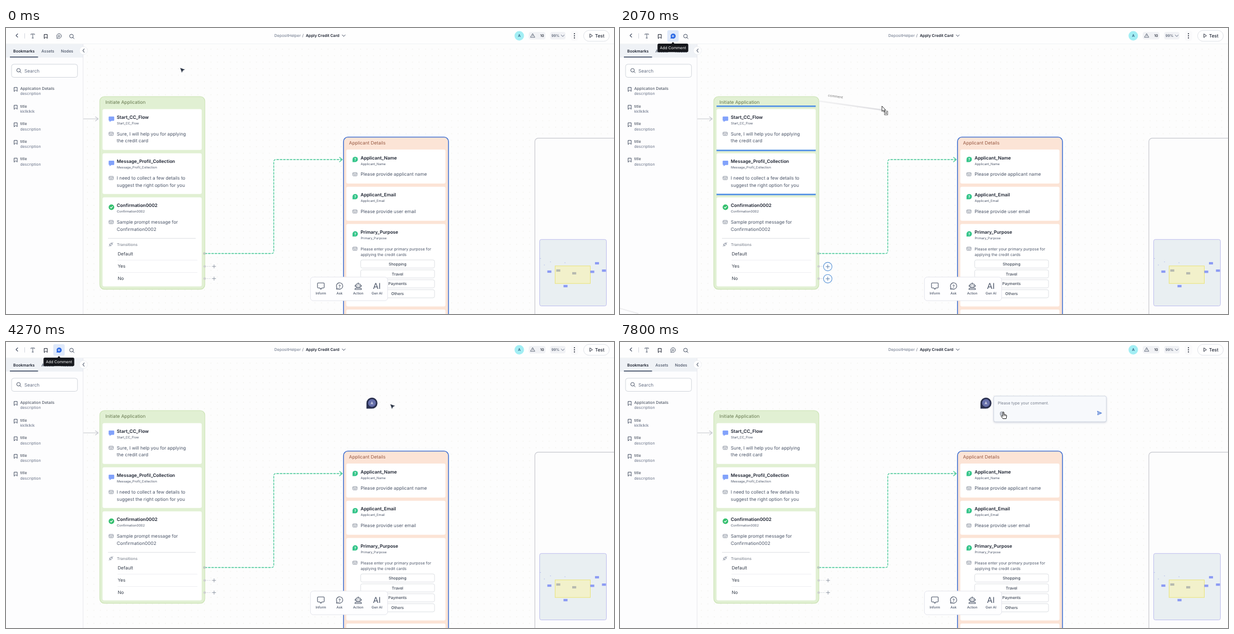
These frames come from a looping animation (1091x513 px, 8000 ms). An HTML page:

```html
<!DOCTYPE html>
<html lang="en">
<head>
<meta charset="utf-8">
<title>Flow builder</title>
<style>
html, body { margin: 0; width: 100%; height: 100%; overflow: hidden; background: #fdfdfd; }
svg { display: block; width: 100vw; height: 100vh; font-family: Inter, Roboto, sans-serif; text-rendering: geometricPrecision; }
</style>
</head>
<body>
<svg id="stage" viewBox="0 0 1091 513"></svg>
<script>
const stage = document.getElementById('stage');
const ink = '#1c2230', slate = '#4b5568', soft = '#667085';

const attrs = o => Object.entries(o).map(([k, v]) => ` ${k}="${v}"`).join('');
const rect = (x, y, w, h, fill, o = {}) => `<rect x="${x}" y="${y}" width="${w}" height="${h}" fill="${fill}"${attrs(o)}/>`;
const circle = (x, y, r, fill, o = {}) => `<circle cx="${x}" cy="${y}" r="${r}" fill="${fill}"${attrs(o)}/>`;
const line = (d, stroke, w = 1, o = {}) =>
  `<path d="${d}" fill="none" stroke="${stroke}" stroke-width="${w}" stroke-linecap="round" stroke-linejoin="round"${attrs(o)}/>`;
const shape = (d, fill, o = {}) => `<path d="${d}" fill="${fill}"${attrs(o)}/>`;
const at = (x, y, body, more = '') => `<g transform="translate(${x} ${y})${more}">${body}</g>`;
const layer = (id, body) => `<g id="${id}" visibility="hidden">${body}</g>`;
// y is the middle of the capitals
const text = (s, x, y, size, fill, weight = 400, anchor = 'start') =>
  `<text x="${x}" y="${y + size * 0.364}" font-size="${size}" fill="${fill}" font-weight="${weight}" text-anchor="${anchor}">${s}</text>`;

const icon = {
  mark: c => line('M-2.6 -3.4H2.6V3.6L0 1.4L-2.6 3.6Z', c, 1),
  lens: (c, r = 3.3) => circle(-.5, -.5, r, 'none', { stroke: c, 'stroke-width': 1 }) + line(`M${r * .6} ${r * .6}L${r + .9} ${r + .9}`, c),
  bubble: c => line('M-3.7 3.9L-3.3 2A4.1 4.1 0 1 1 -1.5 3.6Z', c, 1),
  chat: () => shape('M-3.8 -4.5H3.8Q5 -4.5 5 -3.3V2Q5 3.2 3.8 3.2H0L-3.4 5.4V3.2Q-5 3.2 -5 2V-3.3Q-5 -4.5 -3.8 -4.5Z', '#82a2fb'),
  ask: () => shape('M-4.8 4.8V0A4.8 4.8 0 1 1 0 4.8Z', '#35c58a') + text('?', 0, .1, 6.5, '#fff', 700, 'middle'),
  done: () => circle(0, 0, 5, '#34bf6e') + line('M-2 .1L-.6 1.5L2.1 -1.4', '#fff', 1.2),
  form: () => rect(-3.8, -3, 7.6, 6, 'none', { rx: 1, stroke: '#7b8494', 'stroke-width': .8 }) + line('M-3.8 -1H3.8M-2 1.2H2', '#7b8494', .8),
  chevron: (c, s = 1) => line(`M${2 * s} -3L${-s} 0L${2 * s} 3`, c, 1.1),
  down: c => line('M-2.8 -1.3L0 1.4L2.8 -1.3', c, 1)
};

function header() {
  const dots = [10.2, 14, 17.8].map(y => circle(1020, y, 1, ink)).join('');
  return rect(0, 0, 1091, 28, '#fefefe') + line('M0 28.4H1091', '#f0f1f4', .8) +
    at(19, 13.5, icon.chevron(slate)) + line('M33.5 10V18.5', '#cfd3da', .9) +
    line('M44.8 12V10.8H51.2V12M48 10.8V18M46.7 18H49.3', slate, .9) +
    at(71.5, 15, icon.mark(ink)) + at(95, 14.5, icon.bubble(slate)) + line('M93 14.5H97M95 12.5V16.5', slate, .8) +
    at(118, 15, icon.lens(slate)) +
    text('DepositHelper', 481.5, 13.5, 7, soft) + text('/', 531.5, 13.5, 7, slate) +
    text('Apply Credit Card', 538, 13.5, 7, ink, 600) + at(606, 13.7, icon.down(slate)) +
    circle(921, 14, 8.5, '#a2eef4') + text('A', 921, 14, 6.5, '#2f5a7c', 600, 'middle') +
    rect(938, 7, 30, 13.5, '#f1f2f5', { rx: 4 }) + line('M945.2 10.3L949 16.7H941.4ZM945.2 12.7V14.4', slate, .8) +
    text('10', 958.5, 13.9, 6.4, ink, 500) +
    rect(976.5, 7, 27.5, 13.5, '#f1f2f5', { rx: 4 }) + text('99%', 978.7, 13.9, 6.4, slate, 500) + at(999, 13.9, icon.down(soft)) +
    rect(1013.5, 5, 13, 18, '#fafafb', { rx: 4 }) + dots +
    rect(1036.5, 4.3, 46, 19.5, '#fff', { rx: 9.7, stroke: '#dcdfe5', 'stroke-width': .9 }) +
    line('M1047.7 11V17L1052 14Z', ink, .9) + text('Test', 1057, 14, 8.2, ink, 500);
}

function sidebar() {
  const items = [['Application Details', 'description', 108], ['title', 'kkllklklk', 140], ['title', 'description', 171.4],
    ['title', 'description', 203], ['title', 'description', 234.8]];
  return rect(0, 28.5, 138, 485, '#fdfdfe') + rect(0, 29, 138, 24, '#eff2f6') + line('M138.3 29V513', '#e3e5ea', .8) +
    text('Bookmarks', 13, 41, 7.05, ink, 600) + text('Assets', 63.5, 41, 7.15, slate, 500) + text('Nodes', 98.5, 41, 7.15, slate, 500) +
    rect(7, 51.3, 50.5, 1.7, '#47546b') +
    circle(139, 40.5, 7.2, '#fff', { stroke: '#e9ebef', 'stroke-width': .7 }) + at(138.7, 40.5, icon.chevron(slate, .8)) +
    rect(10, 65, 118.3, 23.5, '#fff', { rx: 4, stroke: '#cdd2da', 'stroke-width': .9 }) +
    at(23, 76.3, icon.lens(slate, 3.2)) + text('Search', 33, 76.6, 8.2, soft) +
    items.map(([a, b, y]) => at(17.5, y + 2, icon.mark(slate)) + text(a, 25.5, y, 7, '#394252') + text(b, 25.5, y + 9.7, 7, soft)).join('');
}

function card(x, y, h, kind, name, lines, size = 8.22) {
  return rect(x, y, 178, h, '#fff', { rx: 3 }) +
    at(x + 16, y + 17.7, icon[kind]()) + text(name, x + 25.6, y + 14.6, 8.2, ink, 600) +
    text(name, x + 25.8, y + 25.4, 5.8, slate) + at(x + 15.5, y + 44.3, icon.form()) +
    lines.map((s, i) => text(s, x + 25.6, y + 44.5 + i * (size * 1.51), size, slate)).join('');
}

function groups() {
  const rows = ['Default', 'Yes', 'No'].map((s, i) => text(s, 200.5, 405 + i * 22.2, 8.1, '#343c4a')).join('');
  const stubs = [427.6, 449.5].map(y => line(`M357 ${y}H368`, '#cfd2d8', .8, { 'stroke-dasharray': '1.5 2' }) + circle(356.5, y, 2.2, '#cdd0cf') +
    line(`M370.3 ${y}H376.3M373.3 ${y - 3}V${y + 3}`, '#8b93a1', .9)).join('');
  const options = ['Shopping', 'Travel', 'Payments', 'Others'].map((s, i) => {
    const y = 423.3 + i * 17.8;
    return rect(636.5, y - 7.3, 132.5, 14.6, '#fff', { rx: 3, stroke: '#d5d8de', 'stroke-width': .8 }) + text(s, 702.6, y, 7, '#3c4554', 500, 'middle');
  }).join('');
  return line('M139 163H165M160.5 159.3L165.5 163L160.5 166.7', '#c6c8ce', 1.1) +
    rect(949, 197.6, 160, 340, '#fdfdfd', { rx: 6, stroke: '#c8c9d0', 'stroke-width': 1.2 }) +
    rect(168.3, 123, 188.5, 345.6, '#e1f0d3', { rx: 8, stroke: '#cbe3b4', 'stroke-width': 1.1 }) +
    text('Initiate Application', 178.5, 133, 8.25, '#66784f') +
    card(173.2, 145.5, 73.2, 'chat', 'Start_CC_Flow', ['Sure, I will help you for applying', 'the credit card']) +
    card(173.2, 224.8, 73, 'chat', 'Message_Profil_Collection', ['I need to collect a few details to', 'suggest the right option for you']) +
    card(173.2, 303.8, 159.8, 'done', 'Confirmation0002', ['Sample prompt message for', 'Confirmation0002']) +
    line('M183.5 377.3H340', '#e3e5e8', 1.2) +
    at(188.5, 388, line('M-2.3 -.4L.4 2.3Q-1 3.4 -2.2 2.2T-2.3 -.4M-.6 -1.8L1.8 .7Q3 -.6 1.9 -1.8T-.6 -1.8M-2.3 2.3L-3.4 3.4M2 -1.9L3.2 -3.1', soft, .8)) +
    text('Transitions', 199, 388.4, 6.9, '#9096a0', 600) + rows +
    line('M200.5 416.4H343M200.5 438.5H343', '#eceef1', .9) + stubs +
    rect(605.6, 195.6, 188.4, 340, '#fce4d6', { rx: 8, stroke: '#2f66d0', 'stroke-width': 1.4 }) +
    text('Applicant Details', 615.5, 205.6, 8.25, '#985841') +
    card(610.6, 218, 61, 'ask', 'Applicant_Name', ['Please provide applicant name']) +
    card(610.6, 284.8, 61, 'ask', 'Applicant_Email', ['Please provide user email']) +
    card(610.6, 351.6, 148, 'ask', 'Primary_Purpose', ['Please enter your primary purpose for', 'applying the credit cards'], 7.05) + options +
    rect(610.6, 505, 178, 40, '#fff', { rx: 3 }) +
    line('M357 404.5H476.5Q480.5 404.5 480.5 400.5V240Q480.5 236 484.5 236H602', '#43c795', 1.3, { 'stroke-dasharray': '3.4 2.6' }) +
    line('M598.5 232L603.5 236L598.5 240', '#43c795', 1.2) + circle(356, 404.5, 2.3, '#bccabe');
}

function palette() {
  const label = (s, x) => text(s, x, 476, 6.1, slate, 500, 'middle');
  return rect(546.3, 446.8, 138.5, 42.3, '#fefeff', { rx: 5, stroke: '#e1e3ea', 'stroke-width': .9 }) +
    line('M560.2 457.3H569.8Q571 457.3 571 458.5V465Q571 466.2 569.8 466.2H567L565 468.6L563 466.2H560.2Q559 466.2 559 465V458.5Q559 457.3 560.2 457.3Z', slate, 1.1) +
    at(598.5, 462.8, line('M-5.4 5.6L-4.8 2.8A5.7 5.7 0 1 1 -2.2 5.1Z', slate, 1.1) + text('?', 0, 0, 7.5, slate, 600, 'middle')) +
    at(632, 463, rect(-4, -4, 8, 6, 'none', { rx: 2, stroke: slate, 'stroke-width': 1.1 }) + circle(-1.6, -1, .8, slate) + circle(1.6, -1, .8, slate) +
      line('M0 -4V-6.2M-5.5 -1.5V.5M5.5 -1.5V.5M-5.8 6V5.2Q-5.8 3.8 -4 3.8H4Q5.8 3.8 5.8 5.2V6Z', slate, 1.1)) +
    text('AI', 665.5, 462.6, 14.5, slate, 400, 'middle') +
    label('Inform', 565) + label('Ask', 598.5) + label('Action', 632) + label('Gen AI', 665.6);
}

function minimap() {
  const nodes = [[975, 437], [1052, 437.3], [1060.5, 422], [1073, 435.2], [1004, 463]];
  const specks = [[959, 413.3], [977, 419.5], [1003, 421], [966, 425]];
  return rect(957.6, 379.3, 119.8, 119.2, '#e9eff2', { rx: 3, stroke: '#b9b8ee', 'stroke-width': .9 }) +
    rect(985.3, 426.8, 63.2, 31.4, '#f2f1cb', { stroke: '#e9e272', 'stroke-width': .9 }) +
    nodes.map(([x, y]) => rect(x - 3.6, y - 2.1, 7.2, 4.2, '#8c9bf4')).join('') +
    [[991, 435], [1019.6, 440]].map(([x, y]) => rect(x - 3.6, y - 2.1, 7.2, 4.2, '#b7bab0')).join('') +
    specks.map(([x, y]) => rect(x - .7, y - .4, 1.5, .9, '#a9b2ea')).join('');
}

function dropZones() {
  return [140.3, 219.6, 298.6].map(y => rect(173.2, y - 1.3, 178, 2.6, '#5291e6')).join('') +
    [428, 449.8].map(y => circle(372.8, y, 7.6, '#fff', { stroke: '#5f97d8', 'stroke-width': 1.1 }) +
      line(`M369.6 ${y}H376M372.8 ${y - 3.2}V${y + 3.2}`, '#5b7fae', 1)).join('');
}

function activeTool() {
  return rect(84.8, 4, 20.5, 20.5, '#dfe9fa', { rx: 3 }) + at(95, 14.5, shape('M-4.4 4.5L-3.8 2A4.6 4.6 0 1 1 -1.6 4.2Z', '#2f6be4')) +
    line('M93.2 14.5H96.8M95 12.7V16.3', '#fff', .9);
}

const tooltip = () => shape('M92 28.5L95 25L98 28.5Z', '#16181d') + rect(67.3, 28, 55.2, 15.3, '#16181d', { rx: 2.5 }) +
  text('Add Comment', 95, 35.8, 6.95, '#fff', 400, 'middle');

const ghost = () => at(-110, -32, rect(0, 0, 124, 23, '#fdfdfd', { opacity: .85 }) +
  rect(0, 22, 118, 2.5, 'url(#fade)') + text('comment', 15, 10.5, 6.1, '#777'), ' rotate(8)');

const skeleton = () => `<g opacity=".9">` + rect(0, 0, 184.5, 105, '#f1f2f5', { rx: 4, stroke: '#dfe1e6', 'stroke-width': .9, filter: 'url(#drop)' }) +
  text('Untitled', 13.5, 9.5, 6.9, '#b3b7be', 600) + rect(5, 21, 175, 81, '#fdfdfe', { rx: 3 }) +
  [36, 60, 84].map(y => circle(19, y, 4, '#eff0f3') + rect(38, y - 4, 133, 8, 'url(#bone)', { rx: 1 })).join('') + '</g>';

const pin = () => shape('M646.8 119.6V109.5A9.9 9.9 0 1 1 656.7 119.6Z', '#2b3150') + circle(656.7, 109.4, 7, '#666fab') +
  text('A', 656.7, 109.4, 6.6, '#fff', 500, 'middle');

const popup = () => rect(670.6, 97, 202.2, 46, '#f7f9fc', { rx: 3, stroke: '#ccd3df', 'stroke-width': .9, filter: 'url(#drop)' }) +
  text('Please type your comment.', 678, 109.2, 7.1, '#747c8b') + text('@', 685.5, 127.4, 9, slate, 400, 'middle') +
  line('M857 124.2L864.3 127.5L857 130.8L858 127.5ZM858 127.5H861.5', '#3f6fd0', 1);

const pointers = {
  arrow: shape('M0 0L10 3.6L5.6 5.6L3.6 10Z', '#2b3445', { stroke: '#fff', 'stroke-width': .8 }),
  hand: shape('M-1 0Q.2 -1 1 .2V4L5.2 5Q6 5.4 5.8 7L5 11.5H-1L-4 7.4Q-4 6 -2.6 6.4L-1 7.4Z', '#fff',
    { stroke: '#222', 'stroke-width': 1, 'stroke-linejoin': 'round' }) + line('M1 4V6.4M2.6 4.6V6.6M4.2 5V6.8', '#333', .6),
  drag: shape('M0 0V9.6L2.2 7.7L3.9 11L5.3 10.3L3.8 7.2H6.8Z', '#fff', { stroke: '#222', 'stroke-width': .9 }) +
    rect(4.8, 9.2, 5.4, 6.6, '#fff', { stroke: '#333', 'stroke-width': .8 }) + line('M6.3 12.5H8.8M7.5 11.2V13.8', '#333', .8),
  beam: line('M-1.8 -4.8Q0 -4.8 0 -3.6Q0 -4.8 1.8 -4.8M0 -3.6V3.6M-1.8 4.8Q0 4.8 0 3.6Q0 4.8 1.8 4.8', '#333', .9)
};

stage.innerHTML = `<defs>
  <pattern id="dots" width="11.67" height="11.67" patternUnits="userSpaceOnUse">${circle(6, 3, .75, '#ecebe4')}</pattern>
  <linearGradient id="fade"><stop stop-color="#e8e8ea" stop-opacity=".5"/><stop offset="1" stop-color="#dcdce0"/></linearGradient>
  <linearGradient id="bone"><stop stop-color="#f3f4f6"/><stop offset="1" stop-color="#e4e6ea"/></linearGradient>
  <filter id="drop" x="-10%" y="-20%" width="120%" height="150%"><feDropShadow dx="0" dy="1.5" stdDeviation="1.8" flood-color="#5b6b8c" flood-opacity=".28"/></filter>
</defs>` + rect(0, 0, 1091, 513, '#fdfdfd') + rect(138, 28, 953, 485, 'url(#dots)') +
  groups() + layer('zones', dropZones()) + minimap() + palette() + sidebar() + header() +
  layer('active', activeTool()) + layer('tip', tooltip()) +
  layer('streak', line('M0 503L32 512', '#eeeef0', 2)) + layer('ghost', ghost()) + layer('skeleton', skeleton()) +
  layer('pin', pin()) + layer('popup', popup()) +
  Object.entries(pointers).map(([id, body]) => layer(id, body)).join('');

const el = id => document.getElementById(id);
const show = (id, on) => el(id).setAttribute('visibility', on ? 'visible' : 'hidden');
const move = (id, x, y) => el(id).setAttribute('transform', `translate(${x.toFixed(2)} ${y.toFixed(2)})`);

// time, x, y of the pointer tip
const route = [[0, 312, 71], [30, 312, 71], [800, 124, 35], [870, 124, 35], [1350, 95, 12], [1700, 95, 12], [2070, 470, 140],
  [2500, 690, 142], [2900, 780, 110], [3350, 650, 120], [3600, 632, 107], [4180, 632, 107], [4270, 689, 111], [4670, 698, 114],
  [4900, 698, 114], [5400, 702, 116], [5670, 702, 116], [5700, 702, 123], [5770, 703, 128], [6270, 703, 128], [6770, 688, 126], [8000, 688, 126]];

function tipAt(t) {
  const i = route.findIndex(p => p[0] > t);
  const [a, b] = [route[i - 1], route[i]];
  const u = (t - a[0]) / (b[0] - a[0]), k = u * u * (3 - 2 * u);
  return [a[1] + (b[1] - a[1]) * k, a[2] + (b[2] - a[2]) * k];
}

function pointerAt(t) {
  if (t < 620) return 'arrow';
  if (t < 1720) return 'hand';
  if (t < 2520) return 'drag';
  if (t < 4200) return 'hand';
  if (t < 5000) return 'arrow';
  return t < 6560 ? 'beam' : 'hand';
}

function draw(t) {
  const [x, y] = tipAt(t), kind = pointerAt(t);
  const within = (a, b) => t >= a && t < b;
  for (const id in pointers) show(id, id === kind);
  move(kind, x, y);
  move('ghost', x, y);
  move('skeleton', x + 15, y - 7);
  show('active', within(1230, 4900));
  show('tip', within(1300, 4900));
  show('zones', within(1850, 2520));
  show('streak', within(1720, 2520));
  show('ghost', within(1720, 2520));
  show('skeleton', within(2520, 4200));
  show('pin', t >= 4200);
  show('popup', t >= 4900);
}

const start = performance.now();
function tick() {
  draw((performance.now() - start) % 8000);
  requestAnimationFrame(tick);
}
tick();
</script>
</body>
</html>
```
